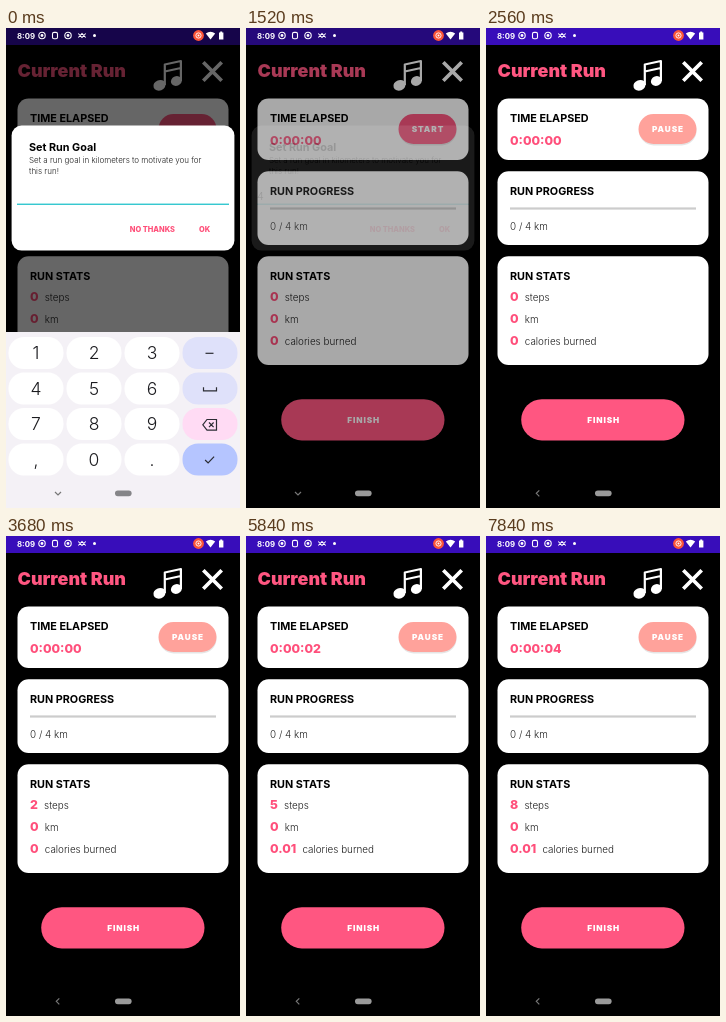
An HTML page for the animation above (8 s loop, 234 px wide and 480 px high).

```html
<!DOCTYPE html>
<html lang="en">
<head>
<meta charset="utf-8">
<title>Run tracker</title>
<style>
  html, body { margin: 0; height: 100%; overflow: hidden; background: #000; }
  svg { display: block; width: 100vw; height: 100vh; font-family: Inter, sans-serif; }
  .pink { fill: #ff5681; }
  .title { font-size: 17.9px; font-weight: 900; }
  .head { font-size: 10.8px; font-weight: 700; }
  .value { font-size: 12.4px; font-weight: 800; fill: #ff4f7b; }
  .label { font-size: 9.9px; font-weight: 300; fill: #222; }
  .button { font-size: 8.2px; font-weight: 900; letter-spacing: .9px; fill: #fff; text-anchor: middle; }
  .body { font-size: 8px; font-weight: 300; fill: #222; }
  .action { font-size: 7.4px; font-weight: 800; fill: #ff4f79; }
  .key { font-size: 17.5px; font-weight: 350; text-anchor: middle; fill: #1b1b1f; }
  .line { fill: none; stroke: #fff; }
</style>
</head>
<body>
<svg viewBox="0 0 234 480">
  <rect width="234" height="480"/>
  <rect width="234" height="17" fill="#380dba"/>

  <!-- Run screen -->
  <text class="title pink" x="11.6" y="48.7">Current Run</text>
  <g fill="#fff">
    <ellipse cx="153.5" cy="57.3" rx="6.2" ry="5.2" transform="rotate(-20 153.5 57.3)"/>
    <ellipse cx="170.4" cy="53" rx="5.6" ry="4.8" transform="rotate(-20 170.4 53)"/>
    <path class="line" stroke-width="2.2" stroke-linejoin="round" d="M158.8 57V36.5L174.9 33V53M158.8 43.5L174.9 40"/>
  </g>
  <path class="line" stroke-width="3.7" d="M197.3 34.3l18.4 18.4m0-18.4l-18.4 18.4"/>
  <g fill="#fff">
    <rect x="11.5" y="70.5" width="211" height="61.5" rx="11"/>
    <rect x="11.5" y="143.2" width="211" height="73.8" rx="11"/>
    <rect x="11.5" y="228.3" width="211" height="108.7" rx="11"/>
  </g>
  <g class="head">
    <text x="24" y="94.3">TIME ELAPSED</text>
    <text x="24" y="167.2">RUN PROGRESS</text>
    <text x="24" y="252.2">RUN STATS</text>
  </g>
  <text class="value" id="timer" x="24" y="116.8"></text>
  <rect x="153" y="88" width="57.5" height="29.4" rx="14.7" fill="#000" opacity=".1"/>
  <rect id="toggle" x="152.5" y="86" width="58" height="30" rx="15"/>
  <text class="button" id="toggleText" x="182" y="104.4"></text>
  <rect x="24" y="179.4" width="186" height="2.2" fill="#ccc"/>
  <text class="label" x="24" y="202">0 / 4 km</text>
  <text class="value" x="24" y="273.3"><tspan id="steps"></tspan><tspan class="label" dx="6.2">steps</tspan></text>
  <text class="value" x="24" y="295.2">0<tspan class="label" dx="6.2">km</tspan></text>
  <text class="value" x="24" y="317.1"><tspan id="calories"></tspan><tspan class="label" dx="6.2">calories burned</tspan></text>
  <rect class="pink" x="35.2" y="371.2" width="163.3" height="41.2" rx="20.6"/>
  <text class="button" x="117.7" y="395.2">FINISH</text>

  <rect id="scrim" width="234" height="480"/>

  <!-- Goal dialog -->
  <g id="dialog">
    <rect x="5.6" y="97.6" width="222.8" height="125" rx="10" fill="#fff"/>
    <text class="head" x="23" y="122.8">Set Run Goal</text>
    <text class="body" x="23" y="134.8">Set a run goal in kilometers to motivate you for</text>
    <text class="body" x="23" y="145.9">this run!</text>
    <text class="label" id="goal" x="11" y="172" style="font-size:10.8px">4</text>
    <rect id="cursor" y="161" width="1.1" height="13" fill="#22c3cb"/>
    <rect x="11" y="175.6" width="212" height="1.3" fill="#22c3cb"/>
    <text class="action" x="123.8" y="204.2">NO THANKS</text>
    <text class="action" x="193" y="204.2">OK</text>
  </g>

  <!-- Keyboard -->
  <g id="keyboard">
    <rect y="304" width="234" height="176" fill="#f4f1f6"/>
    <g id="keys"></g>
    <g class="line" style="stroke:#2b2c33" stroke-width="1.2">
      <path d="M199.5 325.3h8"/>
      <path d="M197.5 359.2v3.6h13v-3.6"/>
      <path d="M196.8 396.8l4.2-5.3h9.5v10.6h-9.5zM203 394.5l4.6 4.6m0-4.6l-4.6 4.6"/>
      <path d="M199.1 432l3 3 6-6.3"/>
    </g>
  </g>

  <!-- System bars -->
  <g fill="#fff">
    <text x="11" y="10.5" font-size="7.8" font-weight="700">8:09</text>
    <g class="line" stroke-width="1.1">
      <circle cx="36" cy="7.5" r="3.2"/>
      <rect x="46.5" y="4.4" width="5" height="6.4" rx="1.5"/>
      <circle cx="62" cy="7.5" r="3.2"/>
      <path d="M72.3 5.5l3.7 4 3.7-4M72.3 9.5l3.7-4 3.7 4"/>
    </g>
    <circle cx="36" cy="7.5" r="1.4"/>
    <circle cx="62" cy="7.5" r="1.4"/>
    <circle cx="88.5" cy="7.5" r="1.5"/>
    <circle cx="192.5" cy="7.5" r="5.4" fill="#fb5438"/>
    <circle class="line" cx="192.5" cy="7.5" r="2.6" stroke-width=".9"/>
    <circle cx="192.5" cy="7.5" r="1"/>
    <path d="M199.8 5.6q4.7-3.6 9.4 0L204.5 11.5z"/>
    <path d="M213 4.4h1.2v-1h2v1h1.2v7.2H213z"/>
  </g>
  <path class="line" id="back" style="stroke:#777" stroke-width="1.2"/>
  <rect id="home" x="109" y="462.5" width="16.6" height="5.7" rx="2.85"/>
</svg>
<script>
const LOOP = 8000, TICK = 80;
const TYPED = 400, CLOSE = 1520, START = 2480;
const el = id => document.getElementById(id);
const clamp = v => Math.max(0, Math.min(1, v));
const passed = (times, t) => times.filter(s => t >= s).length;

const labels = ['123', '456', '789', ',0.'];
const sideFills = ['#dfe1fa', '#dfe1fa', '#ffdbf4', '#b5c5ff'];
el('keys').innerHTML = labels.map((row, r) => [...row, ''].map((label, c) => {
  const x = 2.5 + 58 * c, y = 309 + 35.5 * r;
  return `<rect id="key${label}" x="${x}" y="${y}" width="55" height="32" rx="15.5" fill="${c < 3 ? '#fff' : sideFills[r]}"/>
    <text class="key" x="${x + 27.5}" y="${y + 22.1}">${label}</text>`;
}).join('')).join('');

function draw(t) {
  const open = t < CLOSE, running = t >= START;
  const fade = t - CLOSE;

  el('scrim').style.opacity = open ? 0.6 : 0.34 * clamp(1 - fade / 200);
  el('dialog').style.opacity = open ? 1 : 0.1 * clamp(1 - fade / 80);
  el('keyboard').style.display = open ? '' : 'none';
  el('goal').style.opacity = t >= TYPED ? 1 : 0;
  el('cursor').style.opacity = t >= 80 && t < 1280 ? 1 : 0;
  el('cursor').setAttribute('x', t >= TYPED ? 18.3 : 11);
  const press = t < 320 ? 0 : clamp((720 - t) / 240);
  el('key4').setAttribute('fill', `hsl(240 10% ${100 - 11 * press}%)`);

  el('toggle').setAttribute('fill', running ? '#ffa29b' : '#ff5681');
  el('toggleText').textContent = running ? 'PAUSE' : 'START';
  el('timer').textContent = '0:00:0' + passed([4400, 5440, 6480, 7520], t);
  const steps = [0, 2, 4, 5, 6, 8][passed([3680, 4720, 5680, 6720, 7440], t)];
  el('steps').textContent = steps;
  el('calories').textContent = steps > 4 ? '0.01' : '0';

  el('back').setAttribute('d', t < CLOSE + TICK ? 'M49 464l3 3 3-3' : 'M53.3 462.3l-3 3 3 3');
  el('home').setAttribute('fill', open ? '#858588' : '#9a9a9a');
}

const begin = performance.now();
function frame() {
  const t = (performance.now() - begin) % LOOP;
  draw(Math.floor(t / TICK) * TICK);
  requestAnimationFrame(frame);
}
frame();
</script>
</body>
</html>
```
